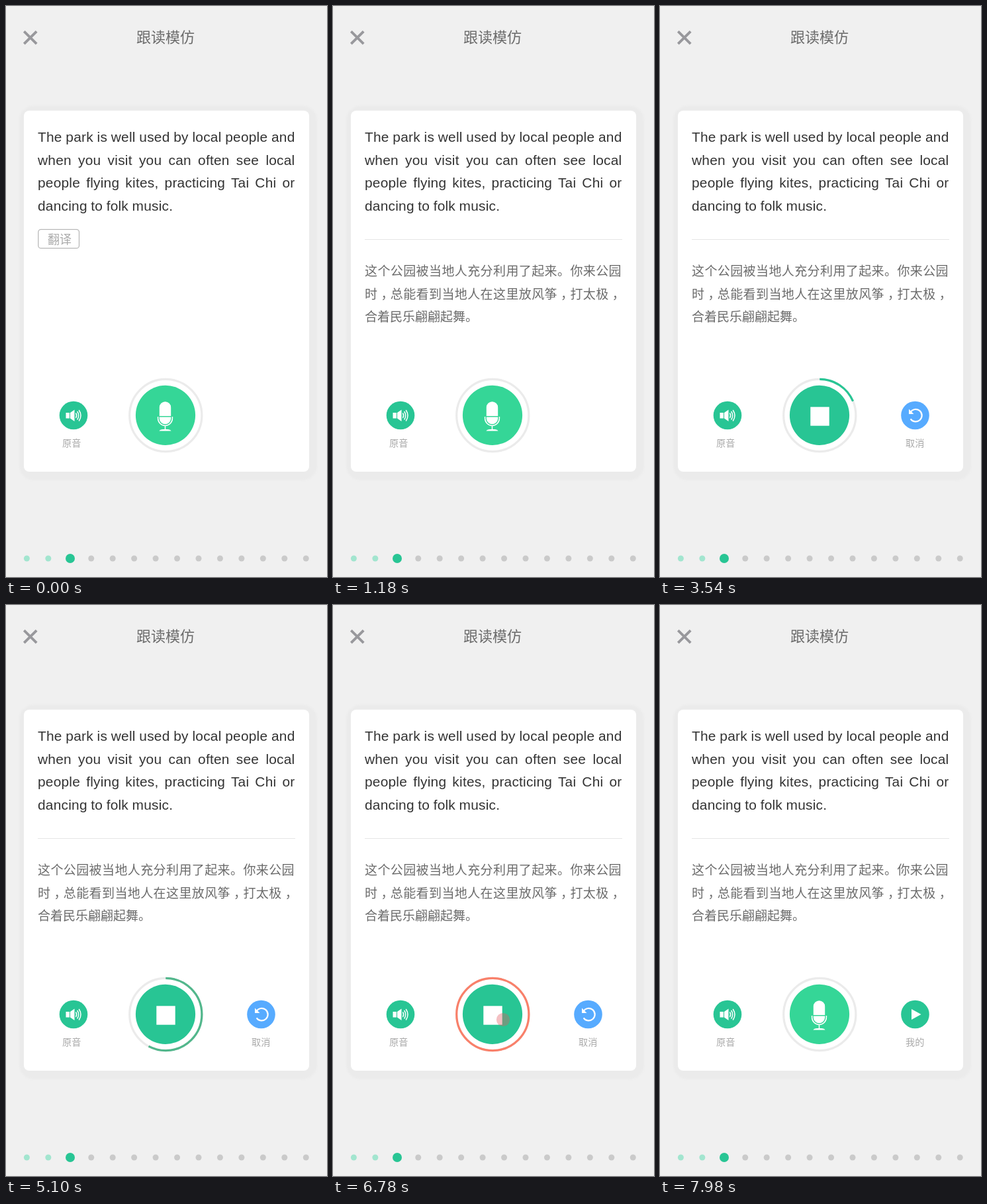
These frames come from a looping animation (485x862 px, 8000 ms). An HTML page:

```html
<!DOCTYPE html>
<html lang="zh-CN">
<head>
<meta charset="utf-8">
<title>跟读模仿</title>
<style>
  html, body { margin: 0; width: 100%; height: 100%; overflow: hidden; background: #f0f0f0; }
  svg { position: absolute; left: 0; top: 0; }
  text { font-family: "Noto Sans CJK SC", "Noto Sans CJK", sans-serif; }
  .passage {
    position: absolute; left: 48px; top: 181px; width: 388.5px; margin: 0;
    font: 20.9px/34.6px "Liberation Sans", Arial, sans-serif;
    letter-spacing: 0.22px; word-spacing: -0.5px;
    color: #333; text-align: justify;
  }
  .justified { letter-spacing: 0.4px; }
  .label { font-size: 14.2px; fill: #a9a9a9; }
  .shade { filter: blur(1px); }
</style>
</head>
<body>
<svg width="485" height="862" viewBox="0 0 485 862">
  <path d="M27.3 38.3 46.2 57.2M46.2 38.3 27.3 57.2" stroke="#98989c" stroke-width="3.9"/>
  <text x="197" y="54.8" font-size="22" fill="#6b6b6b">跟读模仿</text>

  <g id="scoring">
    <circle id="pulse" cx="202.5" cy="121" r="6.3" fill="#a6e6d1"/>
    <text x="223" y="127" font-size="17.4" fill="#999">正在评分</text>
  </g>

  <rect class="shade" x="20" y="150.5" width="450" height="565.5" rx="22" fill="#ebebeb"/>
  <rect x="27" y="158" width="431" height="545" rx="8" fill="#fff"/>

  <g id="toggle">
    <rect x="48.8" y="337.3" width="61.7" height="28.4" rx="4" fill="none" stroke="#b8b8b8" stroke-width="1.3"/>
    <text x="63" y="358.5" font-size="18" fill="#a9a9a9">翻译</text>
  </g>
  <g id="translation">
    <path d="M48 352.5H437" stroke="#e6e6e6"/>
    <g font-size="19" fill="#6b6b6b">
      <text class="justified" x="48" y="407.2">这个公园被当地人充分利用了起来。你来公园</text>
      <text class="justified" x="48" y="441.8">时<tspan dx="5">，</tspan><tspan dx="-5">总能看到当地人在这里放风筝</tspan><tspan dx="5">，</tspan><tspan dx="-5">打太极</tspan><tspan dx="5">，</tspan></text>
      <text x="48" y="476.4">合着民乐翩翩起舞。</text>
    </g>
  </g>

  <circle cx="102" cy="618" r="21.3" fill="#28c594"/>
  <path d="M90.5 614H96V622.5H90.5ZM97 614 103.5 609.5V627L97 622.5Z" fill="#fff"/>
  <path d="M105.7 615Q107.6 618.2 105.7 621.5M108 612.5Q111.4 618.2 108 624M110.5 610.5Q115.5 618.2 110.5 626" fill="none" stroke="#fff" stroke-width="1.5" stroke-linecap="round"/>
  <text class="label" x="85" y="665.3">原音</text>

  <g id="cancel">
    <circle cx="385.5" cy="618" r="21.3" fill="#57abff"/>
    <path d="M378.3 613.5A9.3 9.3 0 1 1 378.6 623.3" fill="none" stroke="#fff" stroke-width="2.2"/>
    <path d="M376 608.5V616H383.5Z" fill="#fff"/>
    <text class="label" x="371" y="665.3">取消</text>
  </g>
  <g id="mine">
    <circle cx="385.5" cy="618" r="21.3" fill="#28c594"/>
    <path d="M380 610V626L394.5 618Z" fill="#fff"/>
    <text class="label" x="371" y="665.3">我的</text>
  </g>

  <circle cx="241.3" cy="618" r="54.6" fill="none" stroke="#ebebeb" stroke-width="3.2"/>
  <circle id="arc" cx="241.3" cy="618" r="54.6" fill="none" stroke-width="3.2" pathLength="360" transform="rotate(-90 241.3 618)"/>
  <circle id="disc" cx="241" cy="617.8" r="45.1"/>
  <g id="mic" fill="#fff">
    <path d="M-8.7 -.6V-13.5A8.7 8.7 0 0 1 8.7 -13.5V-.6Z"/>
    <path d="M-8.7 1H8.7V3A8.7 8.7 0 0 1 -8.7 3Z"/>
    <path d="M-10.9 .5V3A10.9 10.9 0 0 0 10.9 3V.5M0 14V20" fill="none" stroke="#fff" stroke-width="1.5"/>
    <path d="M-9 22Q-8 19.5 -3 19.5H3Q8 19.5 9 22Z"/>
  </g>
  <rect id="stop" x="-14.2" y="-14.2" width="28.4" height="28.4" fill="#fff"/>
  <g id="dots"></g>
  <circle id="touch" fill="#e2585f"/>
</svg>
<p class="passage">The park is well used by local people and when you visit you can often see local people flying kites, practicing Tai Chi or dancing to folk music.</p>

<script>
const LOOP = 8000;
const el = id => document.getElementById(id);
const set = (id, attrs) => { for (const k in attrs) el(id).setAttribute(k, attrs[k]); };
const fade = (id, opacity) => set(id, { opacity });
const ramp = (t, a, b) => Math.min(1, Math.max(0, (t - a) / (b - a)));
const ease = k => k * k * (3 - 2 * k);
const smooth = (t, a, b) => ease(ramp(t, a, b));
const mix = (a, b, k) => `rgb(${a.map((v, i) => Math.round(v + (b[i] - v) * k))})`;

const LIGHT = [53, 214, 151], DARK = [40, 197, 148], CORAL = [249, 128, 106];
const taps = [
  { at: 500, x: 80, y: 355 },
  { at: 2100, x: 257, y: 626 },
  { at: 6660, x: 257, y: 626 }
];

for (let i = 0; i < 14; i++) {
  const c = document.createElementNS('http://www.w3.org/2000/svg', 'circle');
  c.setAttribute('cx', 31.4 + 32.45 * i + (i === 2 ? 0.7 : 0));
  c.setAttribute('cy', 834);
  c.setAttribute('r', i === 2 ? 7 : 4.5);
  c.setAttribute('fill', i < 2 ? '#a2e5cf' : i === 2 ? '#28c594' : '#cacaca');
  el('dots').append(c);
}

// Press shrinks the spot, release spreads it and fades it out.
function drawTouch(t) {
  const tap = taps.find(p => t >= p.at && t < p.at + 600);
  if (!tap) return fade('touch', 0);
  const d = t - tap.at;
  const press = ramp(d, 0, 200), release = ramp(d, 290, 600);
  const r = 7 + 9 * (1 - ease(press)) + 15 * (release && 1 - (1 - release) ** 4);
  set('touch', { cx: tap.x, cy: tap.y, r, opacity: 0.62 * press * (1 - release) });
}

function draw(t) {
  fade('toggle', 1 - smooth(t, 760, 960));
  fade('translation', smooth(t, 820, 1170));

  const mic = 1 - ramp(t, 2320, 2620) + smooth(t, 6890, 7080);
  const stop = smooth(t, 2580, 2800) - smooth(t, 6790, 6910);
  set('mic', { transform: `translate(240.5 619.5) scale(${mic})` });
  set('stop', { transform: `translate(241.5 619.5) scale(${stop})` });
  set('disc', { fill: mix(LIGHT, DARK, smooth(t, 2560, 2800) - smooth(t, 6800, 7040)) });

  const angle = Math.min(360, Math.max(0, (t - 2800) * 0.0905));
  set('arc', {
    stroke: mix(DARK, CORAL, ramp(t, 4900, 5900)),
    'stroke-dasharray': `${angle} 400`,
    opacity: angle ? 1 - ramp(t, 6800, 6960) : 0
  });

  fade('cancel', smooth(t, 2560, 2800) - smooth(t, 6840, 7040));
  fade('mine', smooth(t, 6860, 7060));

  fade('scoring', t < 7980 ? ramp(t, 6900, 7060) : 0);
  set('pulse', { r: 6.2 + 4 * Math.sin(Math.PI * ramp(t, 7080, 7960)) ** 2 });
  drawTouch(t);
}

const start = performance.now();
function tick() {
  draw((performance.now() - start) % LOOP);
  requestAnimationFrame(tick);
}
tick();
</script>
</body>
</html>
```
